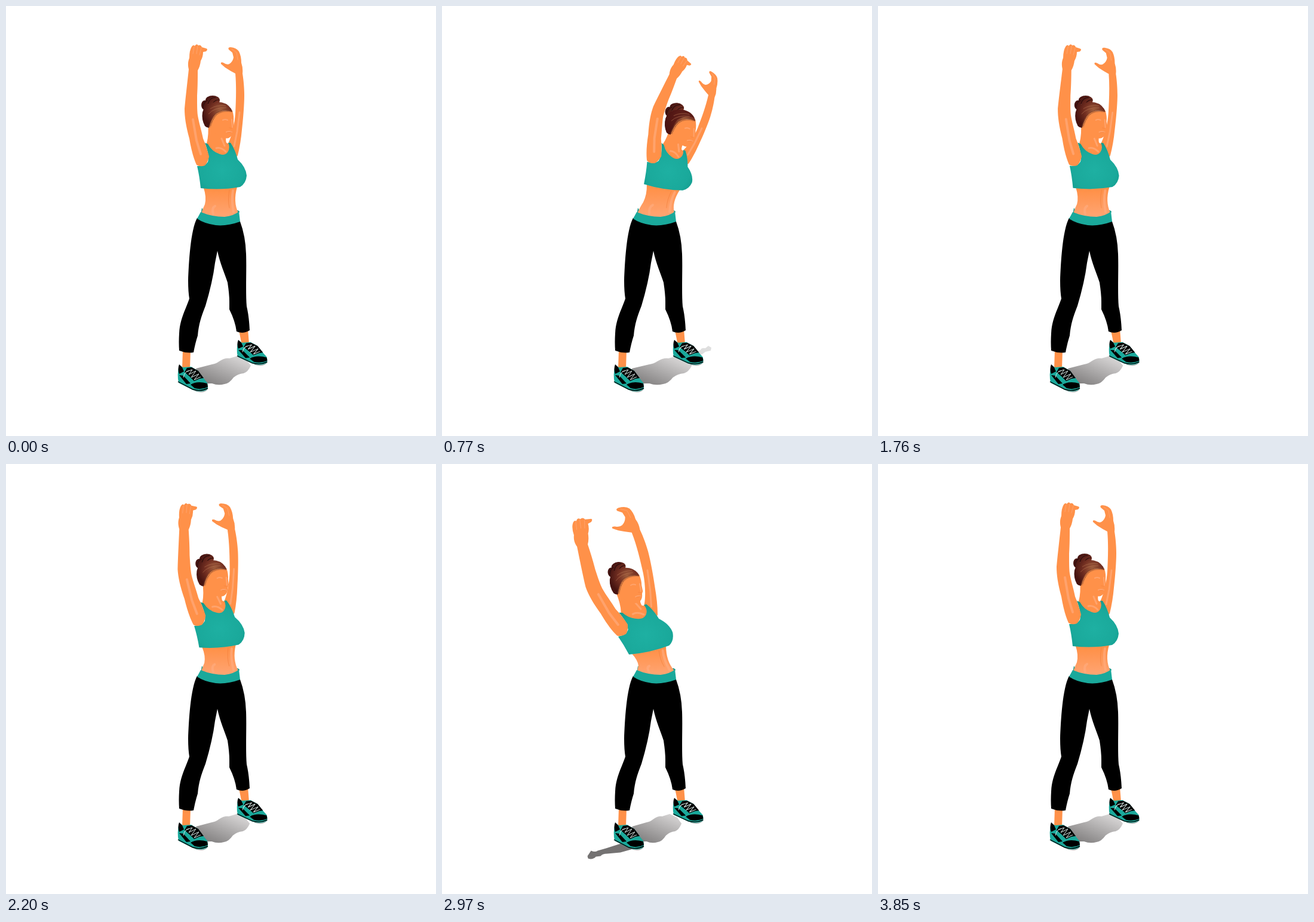
Write an HTML page that moves like this. It is 720 by 720 pixels and loops after 3960 ms.

```html
<!DOCTYPE html>
<html lang="en">
<head>
<meta charset="utf-8">
<title>Standing side bend</title>
<style>
  html, body { margin: 0; width: 100%; height: 100%; overflow: hidden; background: #fff; }
  svg { display: block; width: 100vw; height: 100vh; }
  .skin { fill: #ff9149; }
  .teal { fill: #1aa99b; }
  .glow { fill: none; stroke: #ffad80; stroke-linecap: round; opacity: .65; }
  .shade { fill: none; stroke: #f07c38; stroke-linecap: round; opacity: .6; }
  .hair { fill: url(#hair); }
  .strand { fill: none; stroke: #2c0d0c; stroke-width: 1.2; }
</style>
</head>
<body>
<svg viewBox="0 0 720 720">
  <defs>
    <linearGradient id="floor" gradientUnits="userSpaceOnUse" x1="372" y1="584" x2="350" y2="636">
      <stop offset="0" stop-color="#d2d0d0"/><stop offset="1" stop-color="#858383"/>
    </linearGradient>
    <linearGradient id="bellySkin" x2="0" y2="1">
      <stop offset=".3" stop-color="#ff9149"/><stop offset="1" stop-color="#ffa676"/>
    </linearGradient>
    <radialGradient id="teal" cx=".5" cy=".6" r=".62">
      <stop offset="0" stop-color="#1eb0a2"/><stop offset=".7" stop-color="#1aa99b"/><stop offset="1" stop-color="#139b8d"/>
    </radialGradient>
    <radialGradient id="hair" gradientUnits="userSpaceOnUse" cx="359" cy="175" r="30">
      <stop offset="0" stop-color="#a0603f"/><stop offset=".5" stop-color="#743022"/><stop offset="1" stop-color="#461411"/>
    </radialGradient>
    <g id="shoe">
      <path fill="#aaa" d="M316 645Q333 650 338 641L330 638Z"/>
      <path class="teal" d="M290 601L296 605L310 604L322 611L329 621L337 631Q339 638 337 642Q327 648 313 643L289 631Q286 617 290 601Z"/>
      <path d="M290 600L295 605L298 612L290 616Q287 608 290 600ZM303 606L311 605L322 611L331 623L324 624L315 628L308 621L299 613ZM290 618L297 619L309 632L302 633ZM309 634Q320 627 337 632L338 638Q327 643 316 640Z"/>
      <path fill="none" stroke="#000" stroke-width="1.4" d="M288 629L313 642Q326 646 338 640"/>
      <path fill="none" stroke="#dff0ed" d="M302 612L312 609L306 617L318 611L310 622L323 616L315 626L326 621M297 622Q299 612 306 611"/>
    </g>
  </defs>

  <path id="farShade" fill="#dedede" d="M424 581Q425 577 432 578L437 574L442 577L441 582L432 584L427 588L414 592L412 586Z"/>
  <path id="armShade" fill="#747272" d="M257 649L263 640Q270 643 274 640L288 636L338 620L344 634L312 643L290 645Q282 645 279 649L271 650Q266 656 258 653Z"/>
  <path id="bodyShade" fill="url(#floor)" d="M318 607L345 600Q352 599 357 595Q366 589 374 590L388 586L402 592L410 602Q405 613 398 615Q388 616 381 622Q374 632 366 633Q355 636 345 632L325 632Z"/>

  <path class="skin" d="M296 576H309L308 607H295ZM390 543L405 541L407 566L395 568Z"/>
  <use href="#shoe"/>
  <use href="#shoe" transform="matrix(1.01 0 0 .92 96.1 7.1)"/>
  <path d="M320 355C309 375 306 430 305 460Q305 478 307 490C300 510 291 525 290 548Q289 563 290 577Q302 582 314 580Q317 564 321 552C323 528 330 513 334 502Q346 462 350 430L354 410C358 430 367 450 371 463Q374 483 374 495L374 508Q384 528 386 545Q397 550 408 543Q407 520 403 503C401 480 403 440 402 415Q401 385 392 361Z"/>
  <path fill="#129586" d="M328 338L326 350L388 352L391 344L388 342L334 348Z"/>

  <g class="bends">
    <path class="skin" d="M384 113Q376 109 367 103L360 97Q359 93 364 95Q370 99 374 97Q380 93 381 86L379 78L373 73Q371 69 376 69Q386 70 390 76Q394 84 394 95Q397 104 396 113C398 125 399 140 399 150C399 165 397 190 395 207Q393 230 388 250L380 262L370 235L373 228C379 215 383 195 384 180C385 160 386 135 384 113Z"/>
    <path class="glow" stroke-width="3" d="M391 178L387 210L382 235"/>
    <path class="glow" d="M378 72L386 78L388 90"/>
    <path fill="url(#bellySkin)" d="M328 290L331 305Q336 320 333 332Q330 338 327 347Q340 356 366 356Q382 353 389 346Q380 328 387 303L386 290Z"/>
    <path class="glow" stroke-width="4" d="M380 309Q377 325 381 345M347 349Q344 338 350 335"/>
    <path class="shade" d="M374 308Q371 325 374 338"/>
  </g>

  <path class="teal" d="M326 345Q345 353 366 353Q382 351 390 344L392 361Q370 369 351 367Q331 364 320 356Z"/>

  <g class="bends">
    <path class="skin" d="M338 195Q340 215 336 230L340 246L360 256L380 250L376 232L369 229Q367 222 370 215L352 198Z"/>
    <path class="glow" stroke-width="3" d="M352 238Q360 236 368 244M361 222L366 234"/>
    <path fill="url(#teal)" d="M333 229L338 231Q345 244 358 248Q366 251 371 245Q376 238 372 229L376 229Q384 241 388 257Q402 270 403 284Q402 297 392 303Q360 309 326 305Q324 285 320 268Q333 269 338 261Q341 250 333 229Z"/>
    <path class="skin" d="M306 106C304 98 305 92 307 87Q307 74 311 68Q314 64 316 67Q319 62 322 66Q326 64 328 69L335 71Q339 72 335 76L330 77Q330 85 326 92Q325 101 321 108C321 120 321 135 320 150C320 165 320 175 321 183C323 195 327 207 330 222L334 232Q338 244 340 252Q338 262 333 267Q325 270 319 266C314 255 310 240 307 222C301 200 299 185 299 172C301 150 304 125 306 106Z"/>
    <path class="glow" stroke-width="4" d="M313 190L319 225L326 248"/>
    <path class="glow" d="M315 68L313 80M321 67L319 80M327 70L324 82"/>
  </g>

  <g id="head">
    <path class="skin" d="M345 176L379 175Q382 185 381 193L382 203Q380 206 380 211Q379 218 373 221Q366 223 358 218L345 211Q336 203 338 191Z"/>
    <path class="glow" stroke-width="2" d="M363 191Q367 189 371 191M378 190L379 203M369 211Q374 209 378 211"/>
    <path class="shade" stroke-width=".8" d="M370 212L378 211M374 204L378 205"/>
    <ellipse class="hair" cx="333" cy="166" rx="6" ry="8"/>
    <ellipse class="hair" cx="346" cy="158" rx="12" ry="8"/>
    <path class="strand" d="M330 171Q330 161 338 158M338 164Q341 153 351 153M346 163Q350 157 357 157"/>
    <path class="hair" d="M333 201Q327 190 329 178Q333 163 350 161Q368 159 377 172L379 177Q362 172 351 181Q344 188 340 204Q336 204 333 201Z"/>
    <path id="hairDark" fill="#4d1212" d="M333 201Q327 190 329 178Q333 163 350 161Q368 159 377 172Q362 168 349 178Q342 187 340 204Q336 204 333 201Z"/>
    <path fill="none" stroke="#80452b" stroke-width="4" stroke-dasharray="1 1.3" d="M378 176Q362 173 352 181Q345 188 341 202"/>
    <path fill="none" stroke="#c0805a" stroke-width=".8" opacity=".6" d="M342 172Q353 165 368 167M339 181Q348 170 369 170"/>
  </g>
</svg>
<script>
const STEP = 110, STEPS = 36, WAIST = 345;
const $ = id => document.getElementById(id);
const clamp = v => Math.min(1, Math.max(0, v));
const ease = (n, a, b) => (1 - Math.cos(Math.PI * clamp((n - a) / (b - a)))) / 2;

// Lean of the trunk: over to the right, back, then over to the left and back.
const lean = n => 1.16 * (ease(n, 0, 7) - ease(n, 9, 17))
                - 1.24 * (ease(n, 17.3, 26.5) - ease(n, 27, 35));

// Sideways shift grows with height, and the body tilts about its spine.
function bend(x, y, k) {
  const h = Math.max(0, WAIST - y);
  const tilt = .4 * h / (h + 60), spine = 388 - .225 * h;
  return [
    x + k * h * (.25 - .0005 * (x - WAIST)),
    y + k * tilt * (x - spine) + k * k * .058 * h
  ];
}
const sway = (x, y, k) => [x + k * .08 * (x - 320), y];

const movers = [...document.querySelectorAll('.bends path')].map(el => ({ el, rule: bend }));
movers.push({ el: $('bodyShade'), rule: sway });
for (const m of movers) m.d = m.el.getAttribute('d');

const warp = (d, rule, k) => d.replace(/([\d.]+) ([\d.]+)/g,
  (_, x, y) => rule(+x, +y, k).map(v => v.toFixed(2)).join(' '));

function slide(id, d, opacity) {
  $(id).setAttribute('transform', `translate(${56 * d} ${-31 * d})`);
  $(id).style.opacity = opacity;
}

function draw(k) {
  for (const { el, rule, d } of movers) el.setAttribute('d', warp(d, rule, k));
  const [x, y] = bend(356, 190, k);
  $('head').setAttribute('transform', `translate(${x} ${y}) rotate(${5 * k}) translate(-356 -190)`);
  $('hairDark').style.opacity = .7 * clamp(k);
  slide('armShade', k + 1, clamp(-2 * k));
  slide('farShade', k - 1, clamp(3 * k - 1.5));
}

let start, last;
function tick(now) {
  start ??= now;
  const n = Math.floor((now - start) / STEP) % STEPS;
  if (n !== last) draw(lean(last = n));
  requestAnimationFrame(tick);
}
draw(0);
requestAnimationFrame(tick);
</script>
</body>
</html>
```
